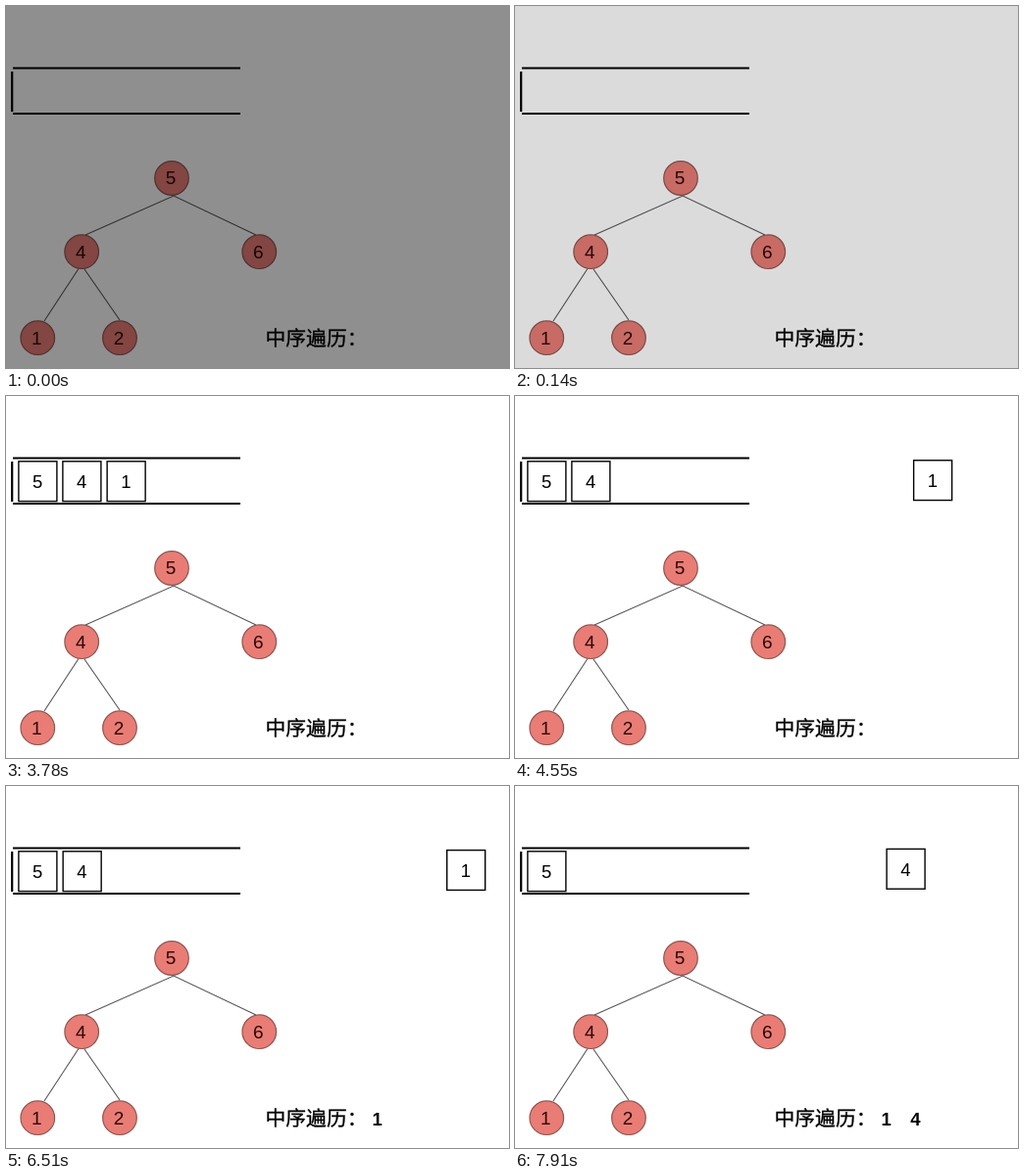
An HTML page that plays this animation: 513 px wide and 370 px high, repeating every 8 s.

```html
<!DOCTYPE html>
<html lang="zh-CN">
<head>
<meta charset="utf-8">
<style>
  html, body { margin: 0; width: 100%; height: 100%; overflow: hidden; background: #fff; }
  svg { display: block; width: 100vw; height: 100vh; }
  text { font-family: "Liberation Sans", sans-serif; font-size: 18.5px; text-anchor: middle; }
  .stack { fill: none; stroke: #000; stroke-width: 2.2; }
  .edges { fill: none; stroke: #55555a; stroke-width: 1.1; }
  .node circle { fill: #e97d75; stroke: #8f5653; stroke-width: 1.2; }
  .node text { fill: #2c0808; font-size: 19px; }
  .tile rect { fill: #fff; stroke: #000; stroke-width: 1.4; }
  .out { font-weight: bold; }
  .label { font-family: "Noto Sans CJK SC", "Noto Sans CJK", sans-serif; font-size: 20.8px;
    font-weight: 500; text-anchor: start; stroke: #000; stroke-width: .3; }
</style>
</head>
<body>
<svg id="stage" viewBox="0 0 513 370">
  <path class="stack" d="M7 63.5H239M7 110H239M6.2 67V108"/>
  <path class="edges" d="M81 234L171 194L255 234M39 322L74 268.5M80 269L116 321"/>
  <g id="nodes"></g>
  <text class="label" x="264.5" y="347">中序遍历：</text>
  <g id="tiles"></g>
  <text class="out" id="out1" x="378.7" y="347">1</text>
  <text class="out" id="out4" x="408.5" y="347">4</text>
  <rect id="shade" width="513" height="370"/>
</svg>
<script>
const LOOP = 8000, STEP = 70;
const $ = id => document.getElementById(id);

function add(parent, tag, attrs, text) {
  const el = document.createElementNS(parent.namespaceURI, tag);
  for (const k in attrs) el.setAttribute(k, attrs[k]);
  if (text) el.textContent = text;
  return parent.appendChild(el);
}

for (const [n, x, y] of [[5, 169, 176], [4, 77.2, 251.2], [6, 258.3, 251.2], [1, 32.3, 339.2], [2, 116, 339.2]]) {
  const g = add($('nodes'), 'g', { class: 'node', transform: `translate(${x} ${y})` });
  add(g, 'circle', { r: 17.3 });
  add(g, 'text', { x: -1, y: 6.4 }, String(n));
}

// Each tile appears at `show`, then may slide from `from` to `to` and fade out.
const tiles = [
  { n: 5, show: 770, from: [32.4, 87.2] },
  { n: 4, show: 1680, from: [77.4, 87.2], to: [398.6, 84.8], start: 6490, dur: 1090 },
  { n: 1, show: 2730, from: [122.3, 87.2], to: [469.2, 86], start: 3760, dur: 1025, fade: 6510, fadeDur: 690 }
];
for (const t of tiles) {
  t.el = add($('tiles'), 'g', { class: 'tile' });
  add(t.el, 'rect', { x: -19.5, y: -20.4, width: 39, height: 40.8 });
  add(t.el, 'text', { x: -0.2, y: 7 }, String(t.n));
}

const clamp = v => Math.max(0, Math.min(1, v));
const ease = v => (1 - Math.cos(Math.PI * clamp(v))) / 2;
const visible = (el, on) => el.setAttribute('visibility', on ? 'visible' : 'hidden');

function draw(ms) {
  const now = Math.min(Math.floor(ms / STEP) * STEP, 7910);
  for (const t of tiles) {
    const p = t.to ? ease((now - t.start) / t.dur) : 0;
    const [x, y] = t.from.map((a, i) => t.to ? a + (t.to[i] - a) * p : a);
    t.el.setAttribute('transform', `translate(${x} ${y})`);
    t.el.setAttribute('opacity', t.fade ? 1 - clamp((now - t.fade) / t.fadeDur) : 1);
    visible(t.el, now >= t.show);
  }
  visible($('out1'), now >= 5390);
  visible($('out4'), now >= 7910);
  $('shade').setAttribute('opacity', now < 280 ? 0.44 * (1 - now / 320) ** 2 : 0);
}

const begin = performance.now();
function tick() {
  draw((performance.now() - begin) % LOOP);
  requestAnimationFrame(tick);
}
tick();
</script>
</body>
</html>
```
